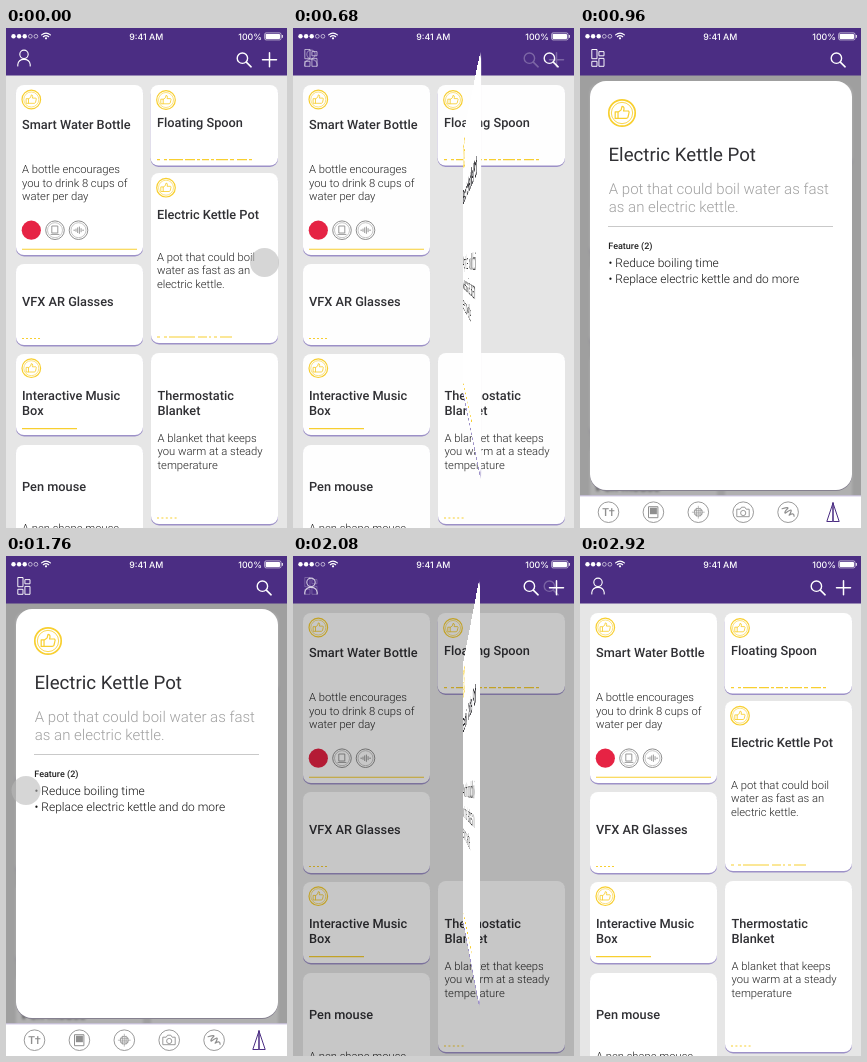
An HTML page for the animation above (3080 ms loop, 281 by 500 pixels).

```html
<!DOCTYPE html>
<html lang="en">
<head>
<meta charset="utf-8">
<title>Card flip</title>
<style>
html, body { margin: 0; width: 100%; height: 100%; overflow: hidden; background: #e6e6e6; }
#stage { position: absolute; left: 0; top: 0; width: 281px; height: 500px; overflow: hidden; background: #e6e6e6; }
#stage > * { position: absolute; left: 0; top: 0; }
svg { display: block; overflow: visible; }
text { font-family: Roboto, Arial, sans-serif; text-rendering: geometricPrecision; white-space: pre; }
#dim { width: 281px; height: 500px; background: #000; }
#touch { width: 29px; height: 29px; border-radius: 50%; background: rgba(185, 185, 185, .58); }
</style>
</head>
<body>
<div id="stage">
  <svg id="grid" width="281" height="500"></svg>
  <div id="dim"></div>
  <svg id="head" width="281" height="48"></svg>
  <svg id="front" viewBox="0 0 127 170" preserveAspectRatio="none"></svg>
  <svg id="back" viewBox="0 0 262 409" preserveAspectRatio="none"></svg>
  <svg id="tabs" width="281" height="33"></svg>
  <div id="touch"></div>
</div>
<script>
const LOOP = 3080, FRAME = 40;
const YELLOW = '#f8cf30', PURPLE = '#4b2d83', INK = '#303034', GREY = '#8f8f8f';
const $ = id => document.getElementById(id);
const clamp = v => Math.max(0, Math.min(1, v));
const span = (t, a, b) => clamp((t - a) / (b - a));
const lerp = (a, b, u) => a + (b - a) * u;
const smooth = u => u * u * (3 - 2 * u);
const easeOut = u => 1 - (1 - u) * (1 - u);

// SVG helpers
const text = (x, y, size, weight, fill, s, extra = '') =>
  `<text x="${x}" y="${y}" font-size="${size}" font-weight="${weight}" fill="${fill}" ${extra}>${s}</text>`;
const path = (d, stroke, w = 1, fill = 'none') =>
  `<path d="${d}" fill="${fill}" stroke="${stroke}" stroke-width="${w}" stroke-linecap="round" stroke-linejoin="round"/>`;
const ring = (x, y, r, stroke, w = 1) =>
  `<circle cx="${x}" cy="${y}" r="${r}" fill="none" stroke="${stroke}" stroke-width="${w}"/>`;
const disc = (x, y, r, fill) => `<circle cx="${x}" cy="${y}" r="${r}" fill="${fill}"/>`;
const rect = (x, y, w, h, rx, fill, more = '') =>
  `<rect x="${x}" y="${y}" width="${w}" height="${h}" rx="${rx}" fill="${fill}" ${more}/>`;
const group = (x, y, k, s) => `<g transform="translate(${x} ${y}) scale(${k})">${s}</g>`;

const panel = (x, y, w, h, r = 8) =>
  rect(x, y + 1.4, w, h, r, '#9d91c8') + rect(x, y, w, h, r, '#fff');
const title = (x, y, lines) =>
  lines.map((s, i) => text(x, y + i * 15.2, 12.75, 500, INK, s)).join('');
const body = (x, y, lines) =>
  lines.map((s, i) => text(x, y + i * 13.4, 11.23, 300, '#222', s)).join('');
const thumb = (x, y, k = 1) => group(x, y, k,
  ring(0, 0, 9.3, YELLOW, 1.2) + ring(0, 0, 7.5, YELLOW, .6) +
  path('M-4.8-.8h2v4.6h-2zM-2.8-.6L-.6-2.2 0-4.6Q1.6-4.6 1.4-2.8L1.1-1.4H4.6Q5.4-.8 4.8.4L4.2 3Q3.8 3.8 3 3.8H-2.8', YELLOW, .85));
const line = (x, y, w, dash = '') =>
  `<path d="M${x} ${y}h${w}" stroke="${YELLOW}" stroke-width="1.1" stroke-dasharray="${dash}"/>`;

const kettle = panel(0, 0, 127, 170) + thumb(15, 14.7) +
  title(6, 46, ['Electric Kettle Pot']) +
  body(6, 88, ['A pot that could boil', 'water as fast as an', 'electric kettle.']) +
  line(6, 164, 75, '3 4 3 2 26 3 9 2 2 3 3 3 12 0');

const badges = disc(25.3, 202.2, 9.6, '#e62344') +
  [49, 72.5].map(x => ring(x, 202.2, 9.3, GREY, 1) + ring(x, 202.2, 7.5, GREY, .5)).join('') +
  path('M46.2 198h5.6v7h-5.6zM45 206.4h8', GREY, .9) +
  path('M67.8 202.2h1M70 201v2.4M71.7 199.8v4.8M73.4 199v6.4M75.1 200.6v3.2M76.6 202.2h1', GREY, .9);

$('grid').innerHTML =
  panel(10, 57, 127, 170) + thumb(25.3, 71.5) + title(16, 101.3, ['Smart Water Bottle']) +
  body(16, 145.2, ['A bottle encourages', 'you to drink 8 cups of', 'water per day']) + badges + line(16, 221.2, 115) +
  panel(144.5, 57, 127.5, 80.5) + thumb(160, 72) + title(151, 99.3, ['Floating Spoon']) +
  line(151, 131.6, 96, '3 4 3 2 14 2 10 2 3 2 7 2 3 2 12 2 4 3 10 2 3 1') +
  panel(10, 236, 127, 81) + title(16, 278, ['VFX AR Glasses']) + line(16, 310.5, 18, '2 2') +
  panel(10, 326, 127, 81) + thumb(25.3, 340.2) + title(16, 371.7, ['Interactive Music', 'Box']) + line(16, 400.6, 55) +
  panel(145, 325, 127, 171) + title(151.5, 371.7, ['Thermostatic', 'Blanket']) +
  body(151.5, 413.7, ['A blanket that keeps', 'you warm at a steady', 'temperature']) + line(151, 490, 20, '2 2.4') +
  panel(10, 417, 127, 120) + title(16, 463, ['Pen mouse']) + body(16, 503.6, ['A pen shape mouse']);

$('front').innerHTML = kettle;

$('back').innerHTML =
  rect(0, 1, 262, 409, 16, '#85808f') + rect(0, 0, 262, 409, 16, '#fff') + thumb(32, 32, 1.42) +
  text(18.5, 79.7, 18.7, 400, INK, 'Electric Kettle Pot') +
  text(18.8, 113, 15, 300, '#a0a0a0', 'A pot that could boil water as fast') +
  text(18.8, 131, 15, 300, '#a0a0a0', 'as an electric kettle.') +
  rect(18, 145, 225, 1, 0, '#c9c9c9') +
  text(18.3, 168, 9, 500, '#222', 'Feature (2)') +
  text(18.5, 186, 12, 300, '#111', '• Reduce boiling time') +
  text(18.5, 202, 12, 300, '#111', '• Replace electric kettle and do more');

const lens = x => ring(x - 1.6, 30.2, 5.2, '#fff', 1.4) + path(`M${x + 2.3} 34.2l4.8 4.6`, '#fff', 1.6);
const status = [0, 1, 2, 3, 4].map(i => i < 3
  ? disc(7.5 + i * 5.6, 8.3, 2.2, '#fff') : ring(7.5 + i * 5.6, 8.3, 1.9, '#fff', .6)).join('') +
  path('M35.6 6.9Q40 3.2 44.4 6.9M37.3 8.7Q40 6.4 42.7 8.7', '#fff', 1.2) + disc(40, 10.3, 1.1, '#fff') +
  text(140.2, 11.6, 8.8, 500, '#fff', '9:41 AM', 'text-anchor="middle" style="font-family:Inter,sans-serif"') +
  text(256, 11.6, 8.8, 500, '#fff', '100%', 'text-anchor="end" style="font-family:Inter,sans-serif"') +
  rect(258.6, 4.9, 16.4, 7, 1.5, 'none', 'stroke="#fff" stroke-width=".6"') +
  rect(259.6, 5.9, 14.4, 5, .7, '#fff') + path('M276.3 7.4v2', '#fff', 1);

$('head').innerHTML = rect(0, 0, 281, 47.5, 0, PURPLE) + status +
  '<g id="person">' + ring(18, 26.3, 4.2, '#fff', 1.1) +
  path('M11.8 38V36.5Q12.4 31.4 18 31.4T24.2 36.5V38', '#fff', 1.1) + '</g>' +
  '<g id="layout">' +
  path('M12.2 21.5h4.8v9.2h-4.8zM12.2 33.3h4.8v5h-4.8zM19.3 23.6h4.7v4.2h-4.7zM19.3 30.4h4.7v7.9h-4.7z', '#fff', .95) + '</g>' +
  '<g id="gridTools">' + lens(238) + path('M263.5 24.8v14M256.5 31.8h14', '#fff', 1.5) + '</g>' +
  '<g id="cardTools">' + lens(258) + '</g>';

const tabArt = [
  text(0, 4.2, 11, 500, GREY, 'T†', 'text-anchor="middle"'),
  path('M-4.5-5.5h9v11h-9z', GREY, 1) + rect(-3.5, -4.5, 7, 6.5, 0, GREY),
  ring(0, 0, 4, GREY, .8) + path('M-6 0H6M0-6V6M-1.8-4V4M1.8-4V4M-4-1.8H4M-4 1.8H4', GREY, .6),
  path('M-6-3h3l1.4-2h3.2L3-3h3v7.5H-6z', GREY, .9) + ring(0, .8, 2.6, GREY, .9),
  path('M-6-3.5Q2-6-1-3T-3 1Q4-4 3-1T1 3Q6 0 6 4', GREY, 1.2)
];
$('tabs').innerHTML = rect(0, 0, 281, 33, 0, '#fff') + rect(0, 0, 281, .8, 0, '#b5a9d3') +
  tabArt.map((s, i) => group(28.5 + i * 44.9, 16.7, 1, ring(0, 0, 10.3, GREY, .9) + s)).join('') +
  path('M253 7.5L246.8 26H252.4zM253 7.5L259.2 26H253.6z', PURPLE, 1);

// Card pose for flip progress p: 0 in the grid, 1 opened.
// Each side is laid out at its foreshortened width so that text stays smooth.
function pose(p) {
  const first = p < .5, u = first ? p * 2 : p * 2 - 1;
  const [side, other] = first ? [$('front'), $('back')] : [$('back'), $('front')];
  const w = first ? lerp(127, 232, u) : lerp(232, 262, u);
  const h = first ? lerp(170, 327, u) : lerp(327, 409, u);
  const y = first ? lerp(230, 236.5, u) : lerp(236.5, 257.5, u);
  const x = lerp(208.5, 141, p);
  const depth = first ? 430 : 430 + 200 * u;
  const turn = (first ? 0 : 180) - 180 * p;
  const flat = Math.max(16, w * Math.cos(turn * Math.PI / 180));
  other.style.display = 'none';
  Object.assign(side.style, {
    display: 'block',
    left: x - flat / 2 + 'px', top: y - h / 2 + 'px',
    width: flat + 'px', height: h + 'px',
    transform: turn ? `perspective(${depth}px) rotateY(${turn}deg) scaleX(${w / flat})` : 'none'
  });
}

function draw(t) {
  const opening = t < 1400;
  const p = opening ? smooth(span(t, 455, 920)) : 1 - Math.pow(span(t, 1760, 2240), 1.6);
  pose(p);

  $('grid').style.filter = p > 0 ? `blur(${1.4 * p}px)` : 'none';
  $('dim').style.opacity = .31 * (opening ? span(t, 676, 920) : 1 - span(t, 2030, 2200));

  const swap = opening ? span(t, 520, 780) : 1 - span(t, 1900, 2140);
  $('person').style.opacity = 1 - swap;
  $('layout').style.opacity = swap;
  $('gridTools').style.opacity = clamp(2 * (1 - swap) - .5);
  $('cardTools').style.opacity = clamp(2 * swap - .25);

  const rise = opening ? easeOut(span(t, 700, 960)) : 1 - smooth(span(t, 1760, 2000));
  $('tabs').style.transform = `translateY(${500 - 32.5 * rise}px)`;

  const swipe = opening ? span(t, 360, 640) : span(t, 1760, 2000);
  const x = opening ? lerp(258.5, 120, smooth(swipe)) : lerp(20, 150, smooth(swipe));
  const held = opening ? t < 640 : t >= 1760 && t < 2000;
  $('touch').style.opacity = held ? clamp(2 - 2 * swipe) : 0;
  $('touch').style.transform = `translate(${x - 14.5}px,220px)`;
}

const start = performance.now();
function tick(now) {
  const t = Math.max(0, now - start) % LOOP;
  draw(Math.floor(t / FRAME) * FRAME);
  requestAnimationFrame(tick);
}
draw(0);
requestAnimationFrame(tick);
</script>
</body>
</html>
```
